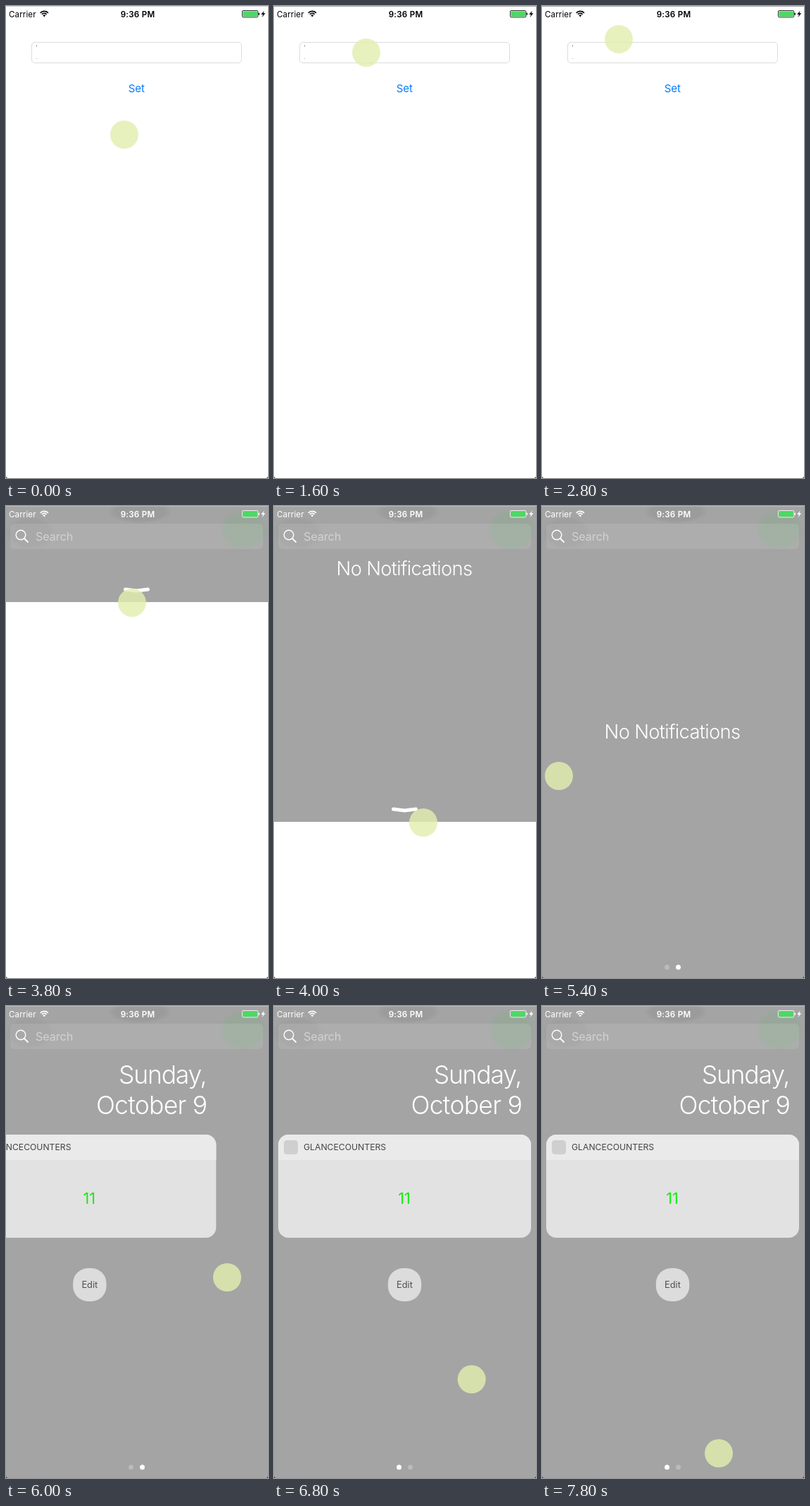
Animation, 372 px wide and 668 px high, one loop 8 s. Source, as an HTML page with a canvas:

```html
<!DOCTYPE html>
<html lang="en">
<head>
<meta charset="utf-8">
<title>Notification panel</title>
<style>
html, body { margin: 0; width: 100%; height: 100%; overflow: hidden; background: #fff; }
canvas { display: block; }
</style>
</head>
<body>
<canvas id="stage" width="372" height="668"></canvas>
<script>
const W = 372, H = 668, LOOP = 8000, STEP = 200;
const PULL = 3400, RELEASE = 4000, SWIPE = 5400, SETTLED = 6272;
const ctx = document.getElementById('stage').getContext('2d');
const FONT = 'Inter, Roboto, "Liberation Sans", sans-serif';

const clamp = v => Math.max(0, Math.min(1, v));
const progress = (t, from, to) => clamp((t - from) / (to - from));
const smooth = k => k * k * (3 - 2 * k);
const smoother = k => k ** 3 * (6 * k * k - 15 * k + 10);
const cubicIn = k => k ** 3;

// The finger rests between strokes
const strokes = [
  { from: 0, to: 1200, x: 143, y: 66 },
  { from: 1400, to: 1600, x: 131, y: 66 },
  { from: 2000, to: 2400, x: 111, y: 70 },
  { from: 2600, to: 2800, x: 109, y: 47 },
  { from: 2800, to: PULL, x: 165, y: 6 },
  { from: PULL, to: RELEASE, x: 212, y: 448, ease: cubicIn },
  { from: RELEASE, to: 4600, x: 134, y: 314 },
  { from: 4600, to: SWIPE, x: 24, y: 382 },
  { from: SWIPE, to: 6000, x: 314, y: 384 },
  { from: 6000, to: 7400, x: 259, y: 622 },
  { from: 7400, to: 7800, x: 251, y: 633 }
];

function touchAt(t) {
  let x = 168, y = 182;
  for (const s of strokes) {
    const k = (s.ease || smooth)(progress(t, s.from, s.to));
    x += (s.x - x) * k;
    y += (s.y - y) * k;
  }
  return { x, y };
}

// Follows the finger, then glides to the bottom edge
function panelBottom(t) {
  if (t <= PULL) return 0;
  const held = touchAt(Math.min(t, RELEASE)).y - 1;
  return H - (H - held) * (t < RELEASE ? 1 : (1 - progress(t, RELEASE, 5000)) ** 2.3);
}

const pageOffset = t => W * (smoother(progress(t, SWIPE, SETTLED)) - 1);

function text(str, x, y, size, color, { weight = 400, align = 'left', spacing = 0 } = {}) {
  ctx.font = `${weight} ${size}px ${FONT}`;
  ctx.letterSpacing = spacing + 'px';
  ctx.textAlign = align;
  ctx.fillStyle = color;
  ctx.fillText(str, x, y);
}

function disc(x, y, r, color) {
  ctx.fillStyle = color;
  ctx.beginPath();
  ctx.arc(x, y, r, 0, Math.PI * 2);
  ctx.fill();
}

function box(x, y, w, h, r, color) {
  ctx.fillStyle = color;
  ctx.beginPath();
  ctx.roundRect(x, y, w, h, r);
  ctx.fill();
}

function line(points, width, color) {
  ctx.lineWidth = width;
  ctx.strokeStyle = color;
  ctx.lineCap = ctx.lineJoin = 'round';
  ctx.beginPath();
  points.forEach(p => ctx.lineTo(...p));
  ctx.stroke();
}

function glow(x, y, rx, ry, rgb, alpha) {
  ctx.save();
  ctx.translate(x, y);
  ctx.scale(rx, ry);
  const g = ctx.createRadialGradient(0, 0, 0, 0, 0, 1);
  g.addColorStop(0.75, `rgba(${rgb},${alpha})`);
  g.addColorStop(1, `rgba(${rgb},0)`);
  disc(0, 0, 1, g);
  ctx.restore();
}

function statusBar(color) {
  text('Carrier', 4, 15.5, 11.6, color, { spacing: 0.1 });
  text('9:36 PM', 187, 15.5, 11.6, color, { weight: 600, align: 'center', spacing: 0.25 });
  // Wi-Fi
  const a = -Math.PI * 0.76, b = -Math.PI * 0.24;
  ctx.strokeStyle = ctx.fillStyle = color;
  ctx.lineCap = 'butt';
  ctx.lineWidth = 1.7;
  for (const r of [4.6, 7.6]) {
    ctx.beginPath();
    ctx.arc(54.3, 15, r, a, b);
    ctx.stroke();
  }
  ctx.beginPath();
  ctx.moveTo(54.3, 15.6);
  ctx.arc(54.3, 15, 2.6, a, b);
  ctx.fill();
  // Battery
  ctx.lineWidth = 0.8;
  ctx.beginPath();
  ctx.roundRect(335.4, 6.5, 22.4, 9.5, 1.6);
  ctx.stroke();
  box(336.3, 7.4, 20.6, 7.7, 0.8, '#4cd964');
  box(358.4, 9.6, 1.4, 3.4, 0.7, color);
  // Bolt
  ctx.fillStyle = color;
  ctx.fill(new Path2D('M366.6 6.4 362.2 12H364.9L363.6 16 368.2 10.2H365.4Z'));
}

function homeScreen(t) {
  ctx.fillStyle = '#fff';
  ctx.fillRect(0, 0, W, H);
  ctx.fillStyle = t < STEP ? '#d0d0d4' : '#a8a8a8';
  ctx.fillRect(0, 0, W, 1);
  ctx.lineWidth = 1;
  ctx.strokeStyle = '#dcdcdc';
  ctx.beginPath();
  ctx.roundRect(36.5, 51.5, 298, 29, 4.5);
  ctx.stroke();
  box(43, 56, 1, 1, 0, '#333');
  box(43, 74, 1, 1, 0, '#aaa');
  text('Set', 185.3, 122, 15, '#007aff', { align: 'center' });
  statusBar('#000');
}

function todayPage(x) {
  ctx.save();
  ctx.translate(x, 0);
  const date = { weight: 300, align: 'right' };
  text('Sunday,', 351, 110, 35.5, '#fff', { ...date, spacing: -1.2 });
  text('October 9', 352, 152.5, 35.5, '#fff', { ...date, spacing: -0.75 });
  box(6, 182, 359, 146, 14.5, '#e2e2e2');
  box(6, 182, 359, 36, [14.5, 14.5, 0, 0], '#eaeaea');
  box(14, 190, 20, 20, 4.5, '#cfcfcf');
  text('GLANCECOUNTERS', 42, 204, 12.2, '#454545');
  text('11', 185, 280, 21.5, '#0fee0f', { align: 'center' });
  box(161.8, 371, 47.4, 47, 21.5, '#dcdcdc');
  text('Edit', 185.5, 399, 12.8, '#505050', { align: 'center' });
  ctx.restore();
}

function searchBar() {
  box(6, 25, 359, 36, 6, 'rgba(255,255,255,.1)');
  ctx.lineWidth = 1.4;
  ctx.strokeStyle = '#fff';
  ctx.beginPath();
  ctx.arc(21, 41, 6.8, 0, Math.PI * 2);
  ctx.stroke();
  line([[26, 46], [31, 51]], 1.8, '#fff');
  text('Search', 42, 49, 16.2, '#d2d2d2', { spacing: -0.1 });
}

// The pull handle turns into page dots as the panel opens
function panelFoot(bottom, onToday) {
  const opened = progress(bottom, 500, 600);
  const white = a => `rgba(255,255,255,${a})`;
  const y = bottom - 18;
  line([[169.5, y], [185.5, y + 2], [201.5, y]], 5, white(1 - opened));
  disc(177.5, bottom - 15.3, 3.5, white(opened * (onToday ? 1 : 0.25)));
  disc(193.5, bottom - 15.3, 3.5, white(opened * (onToday ? 0.25 : 1)));
  if (bottom < H) box(0, Math.round(bottom) - 31, W, 1, 0, white(opened));
}

function panel(t, bottom) {
  const offset = pageOffset(t);
  ctx.save();
  ctx.beginPath();
  ctx.rect(0, 0, W, Math.round(bottom));
  ctx.clip();
  ctx.fillStyle = '#a4a4a4';
  ctx.fillRect(0, 0, W, H);

  // Blurred remains of the screen behind
  glow(190, 8, 46, 17, '120,120,120', 0.2);
  glow(34, 38, 36, 24, '130,130,130', 0.16);
  glow(337, 34, 35, 30, '120,175,128', 0.28);
  box(0, 0, W, 1, 0, 'rgba(255,255,255,.25)');

  searchBar();
  const noteY = 98 + (bottom - 447) * 1.046;
  text('No Notifications', 185 + offset + W, noteY, 27.3, '#fff', { weight: 300, align: 'center', spacing: -0.65 });
  todayPage(offset);
  panelFoot(bottom, offset === 0);
  statusBar('#fff');
  ctx.restore();
}

function corners() {
  ctx.fillStyle = '#222';
  ctx.fill(new Path2D(`M0 ${H}v-3q0 3 3 3zM${W} ${H}v-3q0 3 -3 3z`));
}

function draw(t) {
  const bottom = panelBottom(t), touch = touchAt(t);
  homeScreen(t);
  if (bottom > 0) panel(t, bottom);
  corners();
  disc(touch.x, touch.y, 20, 'rgba(226,238,175,.81)');
}

const start = performance.now();
function tick() {
  const t = (performance.now() - start) % LOOP;
  draw(Math.floor(t / STEP) * STEP);
  requestAnimationFrame(tick);
}
tick();
</script>
</body>
</html>
```
